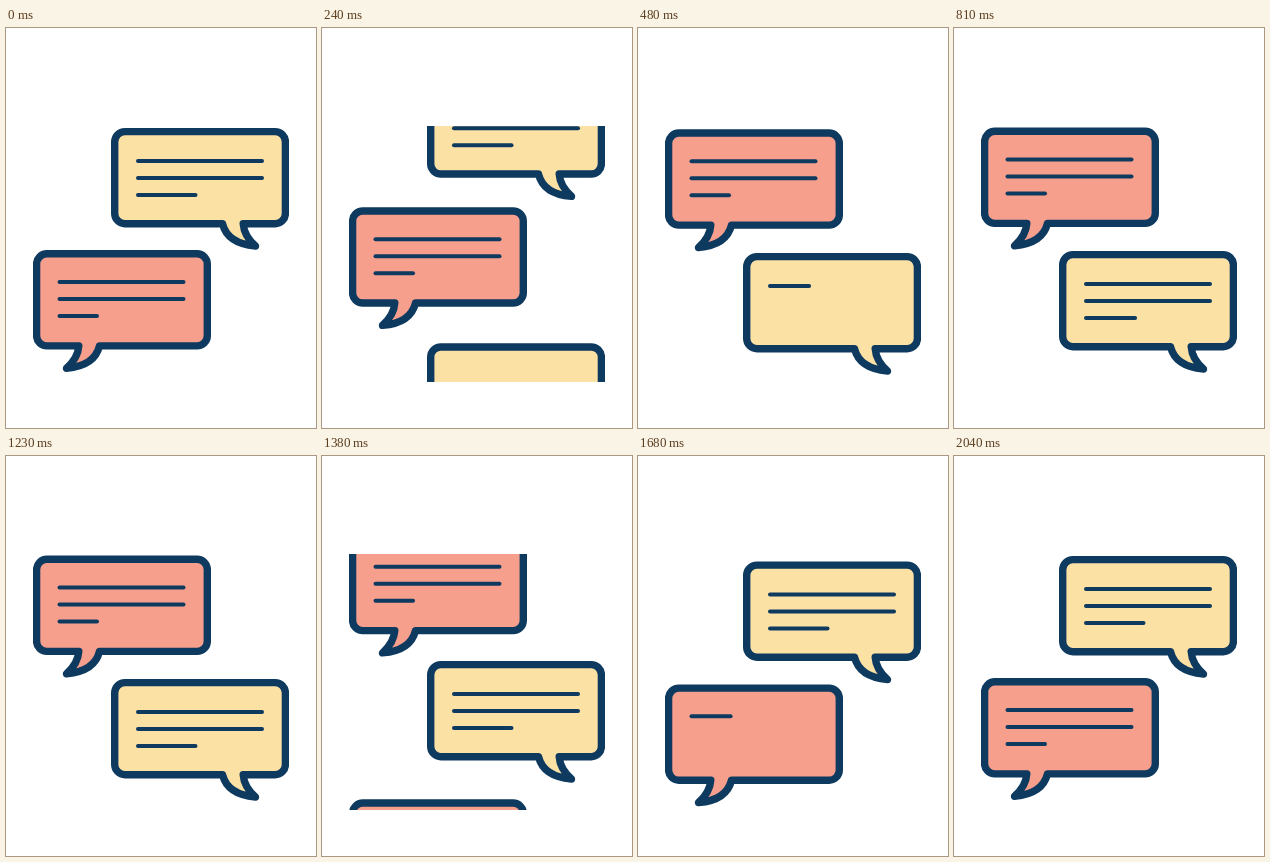
Recreate the animation shown at these times as an HTML page with a canvas. Size 310 by 400 pixels, loop 2430 ms.

```html
<!DOCTYPE html>
<html lang="en">
<head>
<meta charset="utf-8">
<title>Chat bubbles</title>
<style>
  html, body { margin: 0; width: 100%; height: 100%; overflow: hidden; background: #fff; }
  canvas { display: block; width: 310px; height: 400px; }
</style>
</head>
<body>
<canvas id="stage"></canvas>
<script>
const W = 310, H = 400, LOOP = 2430, STEP = 30;
const NAVY = '#0e3a5f';
const TRAVEL = 142; // distance moved by the leaving and the entering bubble

const canvas = document.getElementById('stage');
const ctx = canvas.getContext('2d');
const ratio = window.devicePixelRatio || 1;
canvas.width = W * ratio;
canvas.height = H * ratio;

const yellow = { fill: '#fce1a5', mirror: true, upper: 99.8, lower: 222.8, x: 132, y: 33.1, rows: [124, 124, 57.5] };
const red = { fill: '#f79f8d', mirror: false, upper: 99.5, lower: 222, x: 53.5, y: 32, rows: [124, 124, 37.5] };

const halves = [
  { start: 16, end: 514, type: 439, top: yellow, low: red },
  { start: 1232, end: 1742, type: 1639, top: red, low: yellow }
];
const ROW_TIME = 130;

const clamp = v => Math.max(0, Math.min(1, v));
const mix = (a, b, k) => a + (b - a) * k;

// Cubic bezier easing with control points (.45, 0) and (.67, 1)
function ease(x) {
  if (x <= 0 || x >= 1) return clamp(x);
  let lo = 0, hi = 1, p = 0.5;
  for (let i = 0; i < 24; i++) {
    const q = 1 - p;
    const at = 3 * q * q * p * 0.45 + 3 * q * p * p * 0.67 + p * p * p;
    if (at < x) lo = p; else hi = p;
    p = (lo + hi) / 2;
  }
  return p * p * (3 - 2 * p);
}

function outline() {
  const l = 30.6, r = 201.3, t = 3.8, b = 95.9, c = 10.2;
  ctx.beginPath();
  ctx.moveTo(l + c, t);
  ctx.arcTo(r, t, r, b, c);
  ctx.arcTo(r, b, l, b, c);
  ctx.lineTo(93.5, b);
  ctx.quadraticCurveTo(88.5, 116, 60.5, 118.2);
  ctx.quadraticCurveTo(72, 108, 72.8, b);
  ctx.arcTo(l, b, l, t, c);
  ctx.arcTo(l, t, r, t, c);
  ctx.closePath();
}

function bubble(look, y, typed) {
  ctx.save();
  ctx.translate(0, y);
  ctx.save();
  if (look.mirror) {
    ctx.translate(W, 0);
    ctx.scale(-1, 1);
  }
  outline();
  ctx.fillStyle = look.fill;
  ctx.fill();
  ctx.lineWidth = 7.4;
  ctx.stroke();
  ctx.restore();

  ctx.lineWidth = 4;
  look.rows.forEach((len, i) => {
    const part = clamp(typed - i);
    if (!part) return;
    const rowY = look.y + 17 * i;
    ctx.beginPath();
    ctx.moveTo(look.x, rowY);
    ctx.lineTo(look.x + len * part, rowY);
    ctx.stroke();
  });
  ctx.restore();
}

function draw(t) {
  const half = halves[t < 1200 ? 0 : 1];
  const { top, low } = half;
  const k = ease((t - half.start) / (half.end - half.start));
  const typed = (t - half.type) / ROW_TIME;

  ctx.setTransform(ratio, 0, 0, ratio, 0, 0);
  ctx.fillStyle = '#fff';
  ctx.fillRect(0, 0, W, H);
  ctx.save();
  ctx.beginPath();
  ctx.rect(27, 98, 256, 256);
  ctx.clip();
  ctx.strokeStyle = NAVY;
  ctx.lineCap = ctx.lineJoin = 'round';
  bubble(top, top.upper - TRAVEL * k, 3);
  bubble(low, mix(low.lower, low.upper, k), 3);
  bubble(top, top.lower + TRAVEL * (1 - k), typed);
  ctx.restore();
}

let begin;
function tick(now) {
  begin ??= now;
  const t = Math.max(0, now - begin) % LOOP;
  draw(Math.floor(t / STEP) * STEP);
  requestAnimationFrame(tick);
}
draw(0);
requestAnimationFrame(tick);
</script>
</body>
</html>
```
